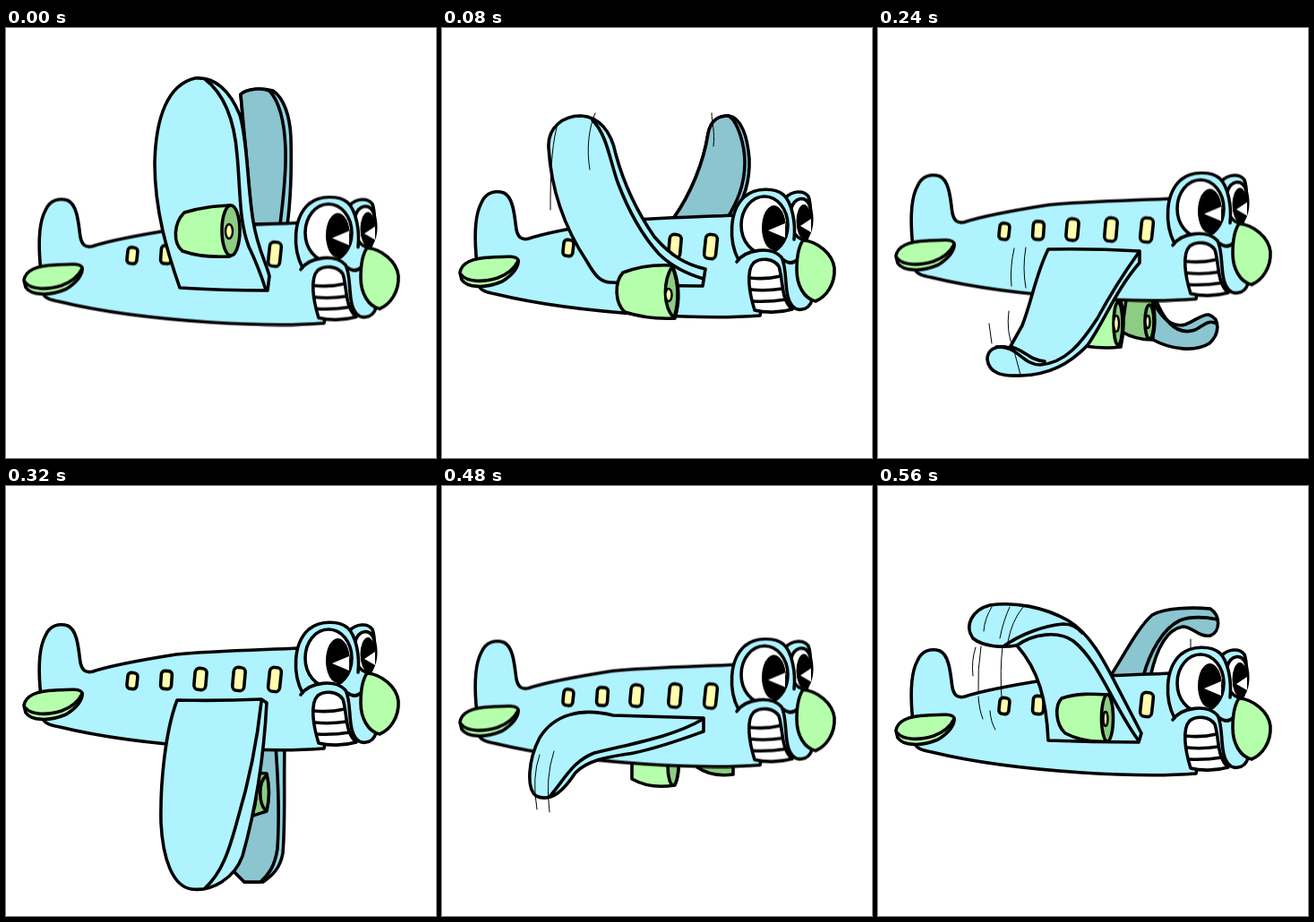
Write an HTML page that moves like this. It is 480 px wide and 480 px high and loops after 640 ms.

```html
<!DOCTYPE html>
<html lang="en">
<head>
<meta charset="utf-8">
<title>Flapping plane</title>
<style>
  html, body { margin: 0; width: 100%; height: 100%; overflow: hidden; background: #fff; }
  svg { display: block; width: 100%; height: 100%; }
  path, ellipse, rect { stroke: #000; stroke-width: 3.6; stroke-linecap: round; stroke-linejoin: round; }
  .sky { fill: #aff3ff; }
  .dim { fill: #8bc5d0; }
  .edge { fill: #91d5e1; }
  .green { fill: #b5ffac; }
  .shade { fill: #8ccc83; }
  .yellow { fill: #fffcad; }
  .white { fill: #fff; }
  .black { fill: #000; }
  .line { fill: none; }
  .bare { stroke: none; }
  .thin { fill: none; stroke-width: 1; }
  .hub { stroke-width: 2.4; }

  .pose { visibility: hidden; animation: show .64s calc(var(--i) * 80ms - 640ms) step-end infinite; }
  .body { animation: bob .64s step-end infinite; }
  @keyframes show { 0% { visibility: visible; } 12.5%, 100% { visibility: hidden; } }
  @keyframes bob {
    0% { transform: translateY(36.5px); }
    12.5%, 87.5% { transform: translateY(28px); }
    25%, 75% { transform: translateY(18.5px); }
    37.5%, 62.5% { transform: translateY(9.5px); }
    50% { transform: none; }
  }
</style>
</head>
<body>
<svg viewBox="0 0 480 480">
  <!-- far wings and hanging engines -->
  <g class="pose" style="--i:0">
    <path class="edge" d="M262 74C270 67 286 67 298 70C310 78 317 98 318 122C319 160 318 190 314 220H275Z"/>
    <path class="dim" d="M262 74C270 67 286 67 294 70C305 82 311 105 312 135C313 165 309 195 306 219H275Z"/>
  </g>
  <g class="pose" style="--i:1">
    <path class="edge" d="M258 213C278 185 292 150 297 118C300 102 309 98 320 98C334 100 341 121 343 146C344 172 337 190 325 213Z"/>
    <path class="dim" d="M258 213C278 185 292 150 297 118C300 102 309 98 320 98C331 105 338 132 338 150C338 176 329 195 318 213Z"/>
    <path class="thin" d="M303 132C305 115 301 105 301 95"/>
  </g>
  <g class="pose" style="--i:2">
    <path class="shade" d="M282 305H325V331C310 332 295 331 285 324Z"/>
    <path class="green" d="M218 300H264Q271 323 264 344C246 347 230 344 218 337Z"/>
    <ellipse class="shade" cx="263" cy="322" rx="6" ry="22"/>
  </g>
  <g class="pose" style="--i:3">
    <path class="dim" d="M306 303C316 324 328 335 343 331C354 327 360 320 369 320C382 324 382 341 370 352C354 362 327 359 307 348Z"/>
    <path class="line" d="M310 303C321 331 336 343 354 337C364 332 368 325 378 330"/>
    <path class="shade" d="M277 303H306Q312 328 306 348C293 348 282 345 272 339Z"/>
    <ellipse class="shade" cx="303" cy="328" rx="5" ry="19"/>
    <ellipse class="yellow hub" cx="301" cy="328" rx="2.5" ry="7"/>
    <path class="green" d="M240 303H271Q277 330 271 356C256 358 244 357 230 355Z"/>
    <ellipse class="shade" cx="268" cy="330" rx="5" ry="24"/>
    <ellipse class="yellow hub" cx="266" cy="330" rx="3" ry="9"/>
  </g>
  <g class="pose" style="--i:4">
    <path class="edge" d="M273 290H311C310 330 312 375 309 410C306 427 297 435 287 442H266L255 431Z"/>
    <path class="dim" d="M273 290H301C304 330 305 375 303 405C300 425 293 434 284 442H266L255 431Z"/>
    <path class="shade" d="M265 325C274 320 283 320 291 321Q296 342 291 363C282 366 275 368 262 373Z"/>
    <path class="line" d="M278 324Q282 346 275 367M291 323C281 330 282 355 290 362"/>
  </g>
  <g class="pose" style="--i:5">
    <path class="edge" d="M301 303H340C354 312 363 336 362 358C360 375 349 382 334 382C315 381 311 350 303 326Z"/>
    <path class="dim" d="M301 303H332C347 313 358 334 357 353C356 371 349 380 337 382C315 381 311 350 303 326Z"/>
    <path class="shade" d="M285 302H326Q331 319 326 330C312 331 295 326 285 315Z"/>
    <ellipse class="shade" cx="323" cy="317" rx="5" ry="13"/>
    <path class="green" d="M230 298H262Q269 320 262 341C244 344 230 341 215 337Z"/>
    <ellipse class="shade" cx="258" cy="317" rx="6" ry="23"/>
    <ellipse class="yellow hub" cx="255" cy="314" rx="3.5" ry="8"/>
    <path class="thin" d="M328 382Q324 402 317 418"/>
  </g>
  <g class="pose" style="--i:6">
    <path class="shade" d="M285 300H325V322C310 324 295 321 285 314Z"/>
    <path class="green" d="M212 290H260Q268 312 260 334C242 337 226 335 212 327Z"/>
    <ellipse class="shade" cx="258" cy="312" rx="6" ry="22"/>
  </g>
  <g class="pose" style="--i:7">
    <path class="dim" d="M259 213C274 190 290 158 306 144C320 136 350 135 371 137C383 145 382 163 371 167C357 169 352 157 340 157C323 160 311 181 304 213Z"/>
    <path class="line" d="M296 213C303 186 318 159 337 150C350 145 364 146 379 149"/>
    <path class="thin" d="M349 180V171"/>
  </g>

  <g class="body">
    <path class="sky" d="M356 288L355 293C318 296 275 295 228 292C169 288 105 280 60 269Q41 266 41 258L38 225C36 200 37 180 44 167C49 155 60 153 69 156C80 161 81 183 83 197C85 206 89 209 97 207C118 200 152 194 190 188C232 184 285 183 328 181"/>
    <path class="sky bare" d="M326 183L395 190L410 210L413 277C405 288 395 287 388 284L356 290Z"/>
    <path class="green" d="M20 245C22 234 33 229 55 228C72 227 83 226 85 231C86 238 80 247 67 255C48 263 28 262 22 253Z"/>
    <path class="line" d="M21 247C28 256 46 256 62 251C73 247 81 240 85 232"/>
    <g class="yellow">
      <rect x="135.500" y="208.500" width="11" height="18" rx="4" transform="rotate(6 141 217)"/>
      <rect x="173" y="206.500" width="12" height="20" rx="4" transform="rotate(4 179 216)"/>
      <rect x="210.500" y="203.500" width="13" height="24" rx="5" transform="rotate(5 217 215)"/>
      <rect x="253.500" y="202.500" width="13" height="26" rx="5" transform="rotate(5 260 215)"/>
      <rect x="293.500" y="202.500" width="13" height="27" rx="5" transform="rotate(6 300 216)"/>
    </g>
    <path class="sky" d="M383 162C391 153 404 153 409 160C412 168 413 190 407 208"/>
    <path class="white" d="M390 173C394 161 405 159 410 169C415 184 413 200 405 209C398 207 394 203 392 199Z"/>
    <ellipse class="black bare" cx="404" cy="188" rx="8.500" ry="19"/>
    <path class="white bare" d="M400 193L412 185V200Z"/>
    <path class="sky" d="M331 231C320 210 320 176 338 160C350 150 371 150 381 158C391 167 395 190 393 208"/>
    <ellipse class="white" cx="360" cy="192" rx="26" ry="32"/>
    <ellipse class="black bare" cx="370.500" cy="195" rx="13.500" ry="25"/>
    <path class="white bare" d="M364 198L383 190V206Z"/>
    <path class="sky bare" d="M330 235C342 218 368 216 380 230L388 284L350 288Z"/>
    <path class="line" d="M329 233C339 219 367 215 379 228C384 237 383 253 385 266C387 281 394 288 402 286Q410 285 413 276M380 230Q390 238 397 230"/>
    <path class="white" d="M349 287C343 268 339 243 348 234C356 228 370 229 376 238C381 253 378 275 391 286C377 290 360 290 349 287Z"/>
    <path class="line" d="M344 251Q361 253 378 249M345 264Q361 266 380 263M347 277Q365 278 384 275"/>
    <path class="green" d="M403 209C419 210 436 224 438 240C439 258 429 272 417 277C404 274 396 259 396 242C396 228 398 216 403 209Z"/>
  </g>

  <!-- near wings -->
  <g class="pose" style="--i:0">
    <path class="sky" d="M194 290C180 250 166 204 166 151C167 99 181 63 211 56C233 54 250 70 261 97C270 127 269 174 276 216C281 247 291 263 294 277L292 293Q240 293 194 290Z"/>
    <path class="line" d="M222 57C243 73 255 103 258 142C262 185 260 215 271 244Q282 267 290 292"/>
    <path class="green" d="M199 206C217 200 234 199 250 198V255C232 256 214 255 197 249C186 240 187 218 199 206Z"/>
    <ellipse class="shade" cx="251" cy="226" rx="10" ry="28"/>
    <ellipse class="yellow hub" cx="249" cy="227" rx="4" ry="8"/>
  </g>
  <g class="pose" style="--i:1">
    <path class="sky" d="M190 284C177 285 170 275 162 261C142 231 122 187 119 133C118 111 135 98 155 98C175 99 189 115 194 141C203 174 219 207 237 233C255 254 272 264 294 269L291 288Q240 288 190 284Z"/>
    <path class="line" d="M168 103C184 119 187 146 196 172C207 201 223 231 242 252C257 267 275 275 292 280"/>
    <path class="green" d="M202 273C220 266 240 264 257 265Q269 294 260 324C240 325 222 323 204 317C193 307 192 284 202 273Z"/>
    <path class="shade" d="M257 266C247 282 246 310 259 324Q268 294 257 266Z"/>
    <ellipse class="yellow hub" cx="253" cy="298" rx="3.500" ry="7"/>
    <path class="thin" d="M121 203C121 167 122 135 128 111M165 158C161 135 164 111 171 95"/>
  </g>
  <g class="pose" style="--i:2">
    <path class="sky" d="M191 257C177 280 163 296 146 293C126 286 118 263 102 264C87 267 88 288 99 304C115 328 151 334 185 326C225 315 260 292 292 269V258Z"/>
    <path class="line" d="M108 265C120 291 132 317 170 317C215 312 250 285 290 260"/>
  </g>
  <g class="pose" style="--i:3">
    <path class="sky" d="M190 247C176 275 172 304 161 332L147 357C130 353 122 360 122 370C124 386 139 389 160 388C190 387 213 376 234 354C253 327 265 293 292 262V249Q240 246 190 247Z"/>
    <path class="line" d="M132 356C156 354 161 376 181 376C209 374 227 352 245 324Q265 287 290 252M148 356C162 358 169 371 186 372"/>
    <path class="thin" d="M124 330L127 352M146 316Q143 340 151 357L159 387M152 246Q147 268 149 288M165 245Q161 268 165 290"/>
  </g>
  <g class="pose" style="--i:4">
    <path class="sky" d="M191 239C178 273 172 331 173 376C175 416 186 447 207 450C230 453 255 438 264 413C275 374 287 319 291 242L285 238Q240 240 191 239Z"/>
    <path class="line" d="M285 241C280 288 270 334 258 374C249 407 241 432 222 449"/>
  </g>
  <g class="pose" style="--i:5">
    <path class="sky" d="M191 247C158 263 140 311 130 345C124 373 122 401 132 415C142 426 159 423 177 413C196 401 203 366 217 335C233 304 259 279 291 265V250Q240 245 191 247Z"/>
    <path class="line" d="M289 252C256 264 229 289 211 319C194 352 188 397 162 420"/>
    <path class="thin" d="M150 376C152 410 160 435 171 449M163 383Q171 415 184 431"/>
  </g>
  <g class="pose" style="--i:6">
    <path class="sky" d="M191 256C155 247 125 255 109 281C96 306 94 338 105 346C123 354 137 338 149 320C165 304 191 302 214 298C243 292 270 282 292 274V259Z"/>
    <path class="line" d="M120 347C137 327 146 307 170 298C214 287 257 280 290 261"/>
    <path class="thin" d="M109 300Q100 325 106 361M125 296Q115 326 120 364"/>
  </g>
  <g class="pose" style="--i:7">
    <path class="sky" d="M190 284C188 240 180 206 155 178C137 181 117 179 106 170C96 156 105 138 125 133C153 129 185 135 212 150C236 164 252 194 267 224L294 276L291 286Q240 286 190 284Z"/>
    <path class="line" d="M155 178C173 165 201 161 218 173C246 195 262 244 290 283M140 179C160 165 185 156 207 154Q219 154 228 164"/>
    <path class="green" d="M205 237C222 231 240 232 257 233V285C241 286 224 284 209 276C198 266 197 245 205 237Z"/>
    <ellipse class="shade" cx="256" cy="259" rx="6.500" ry="26"/>
    <ellipse class="yellow hub" cx="254" cy="260" rx="2.500" ry="8"/>
    <path class="thin" d="M118 162Q119 148 127 135M136 170Q140 150 147 135M145 174Q149 151 162 135M109 180Q104 195 106 212M115 179Q111 205 112 230M139 179Q136 205 138 238M112 235Q113 250 117 260M125 251Q126 264 131 272"/>
  </g>
</svg>
</body>
</html>
```
